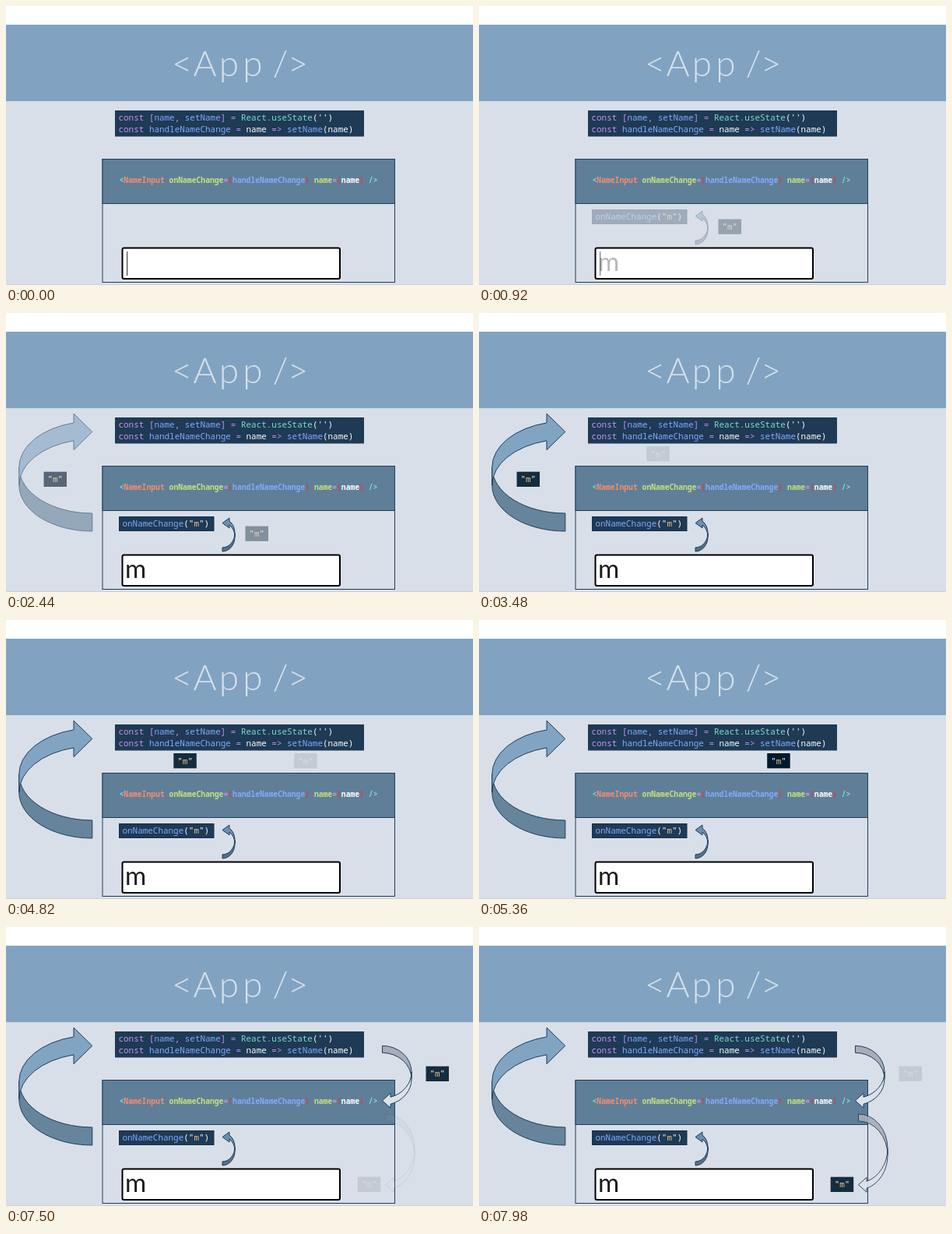
An HTML page for the animation above (8000 ms loop, 600 by 358 pixels).

```html
<!DOCTYPE html>
<html lang="en">
<head>
<meta charset="utf-8">
<title>State flow</title>
<style>
html, body { margin: 0; height: 100%; overflow: hidden; background: #fff }
svg { display: block; width: 600px; height: 358px }
.code { font: 10.95px "Noto Sans Mono", "DejaVu Sans Mono", monospace; white-space: pre; fill: #fff }
.jsx { font-size: 9.71px; font-weight: 700 }
.title { font: 300 46px Lato, sans-serif; fill: #d6e0ec; text-anchor: middle }
.typed { font: 33px Lato, sans-serif; fill: #1c1c1c }
.p { fill: #c792ea } .b { fill: #82aaff } .t { fill: #7fdbca }
.o { fill: #f78c6c } .g { fill: #c5e478 } .r { fill: #d3423e } .s { fill: #ecc48d }
</style>
</head>
<body>
<svg viewBox="0 0 600 358">
  <rect y="24" width="600" height="98.5" fill="#81a3c1"/>
  <rect y="122.5" width="600" height="234.5" fill="#d9dfe8"/>
  <rect y="357" width="600" height="1" fill="#cdd0d6"/>
  <text class="title" y="90" x="226 255.5 286.5 317 335 352.5 375">&lt;App /&gt;</text>

  <rect x="140" y="134" width="320" height="33.5" fill="#1e3a55"/>
  <text class="code" x="144.5" y="147.3"><tspan class="p">const [</tspan><tspan class="b">name</tspan><tspan class="p">, </tspan><tspan class="b">setName</tspan><tspan class="p">] = </tspan><tspan class="t">React.useState</tspan>('')</text>
  <text class="code" x="144.5" y="161.8"><tspan class="p">const </tspan><tspan class="b">handleNameChange</tspan><tspan class="p"> = </tspan>name<tspan class="p"> =&gt; </tspan><tspan class="b">setName</tspan>(name)</text>

  <g stroke="#1f3d5a">
    <rect x="124" y="196.5" width="375.5" height="158" fill="none"/>
    <rect x="124" y="196.5" width="375.5" height="57" fill="#5f7f98"/>
  </g>
  <text class="code jsx" x="145.5" y="227.3"><tspan class="t">&lt;</tspan><tspan class="o">NameInput </tspan><tspan class="g">onNameChange</tspan><tspan class="p">=</tspan><tspan class="r">{</tspan><tspan class="b">handleNameChange</tspan><tspan class="r">} </tspan><tspan class="g">name</tspan><tspan class="p">=</tspan><tspan class="r">{</tspan>name<tspan class="r">} </tspan><tspan class="t">/&gt;</tspan></text>

  <rect x="149.5" y="310.5" width="279.5" height="39.5" rx="2" fill="#fff" stroke="#000" stroke-width="2"/>
  <path data-out="0" d="M155.7 315V346" stroke="#222"/>
  <text data-in="0" class="typed" x="153" y="340">m</text>
  <g data-in="0">
    <rect x="145.5" y="261.5" width="121.5" height="18" fill="#1e3a55" stroke="#16304a"/>
    <text class="code" x="149.5" y="274"><tspan class="b">onNameChange</tspan>("<tspan class="s">m</tspan>")</text>
  </g>
  <g id="extras"></g>
</svg>
<script>
const STARTS = [800, 2140, 3480, 4820, 6160, 7500];
const LOOP = 8000, STEP = 60, STEPS = 10;
const extras = document.getElementById('extras');

// Two-tone curved arrow: tail at the bottom right, head at the top right before flipping.
function arrow(step, x, y, flipX, flipY, rx, ry, th, head, wide, light, dark) {
  const k = ry * Math.sqrt(1 - (head / rx) ** 2), neck = rx - head, mid = th / 2 - k;
  const arc = (sweep, px, py) => `A${rx} ${ry} 0 0 ${sweep} ${px} ${py}`;
  return `<g data-in="${step}"><g transform="translate(${x} ${y}) scale(${flipX} ${flipY})" stroke="#1f3d5a" stroke-linejoin="round">
    <path fill="${dark}" d="M0 ${th}${arc(0, rx, ry + th)}V${ry}${arc(1, 0, 0)}Z"/>
    <path fill="${light}" d="M0 0${arc(1, neck, -k)}V${mid - wide / 2}L${rx} ${mid}L${neck} ${mid + wide / 2}V${th - k}${arc(0, 0, th)}Z"/>
  </g></g>`;
}

function label(step, x, y) {
  return `<g data-in="${step}" data-out="${step + 1}">
    <rect x="${x}" y="${y}" width="29.5" height="19.3" fill="#02192d"/>
    <text class="code" x="${x + 14.8}" y="${y + 13.5}" text-anchor="middle">"<tspan class="s">m</tspan>"</text></g>`;
}

extras.innerHTML =
  arrow(0, 294, 282.4, -1, 1, 16, 18.6, 5, 9, 13, '#6c8fb0', '#557089') +
  arrow(1, 16.8, 198, 1, 1, 94, 59, 23, 23.8, 46.5, '#81a4c3', '#66849b') +
  arrow(4, 521, 195, -1, -1, 37.5, 33.6, 9, 10.5, 19, '#dde2ea', '#a8adba') +
  arrow(5, 525, 293, -1, -1, 37.5, 44, 9, 10.5, 19, '#dde2ea', '#a8adba') +
  [[307.5, 273.5], [48.5, 203.7], [215.3, 171], [370.2, 171], [539.5, 178.7], [451.7, 320.7]]
    .map(([x, y], i) => label(i, x, y)).join('');

const faders = [...document.querySelectorAll('[data-in], [data-out]')];

function progress(step, t) {
  const start = STARTS[step];
  if (start === undefined || t < start) return 0;
  return Math.min(STEPS, Math.floor((t - start) / STEP) + 1) / STEPS;
}

function draw(now) {
  const t = now % LOOP;
  for (const el of faders) {
    const shown = 'in' in el.dataset ? progress(el.dataset.in, t) : 1;
    el.setAttribute('opacity', shown - progress(el.dataset.out, t));
  }
}

const begin = performance.now();
function tick() {
  draw(performance.now() - begin);
  requestAnimationFrame(tick);
}
tick();
</script>
</body>
</html>
```
